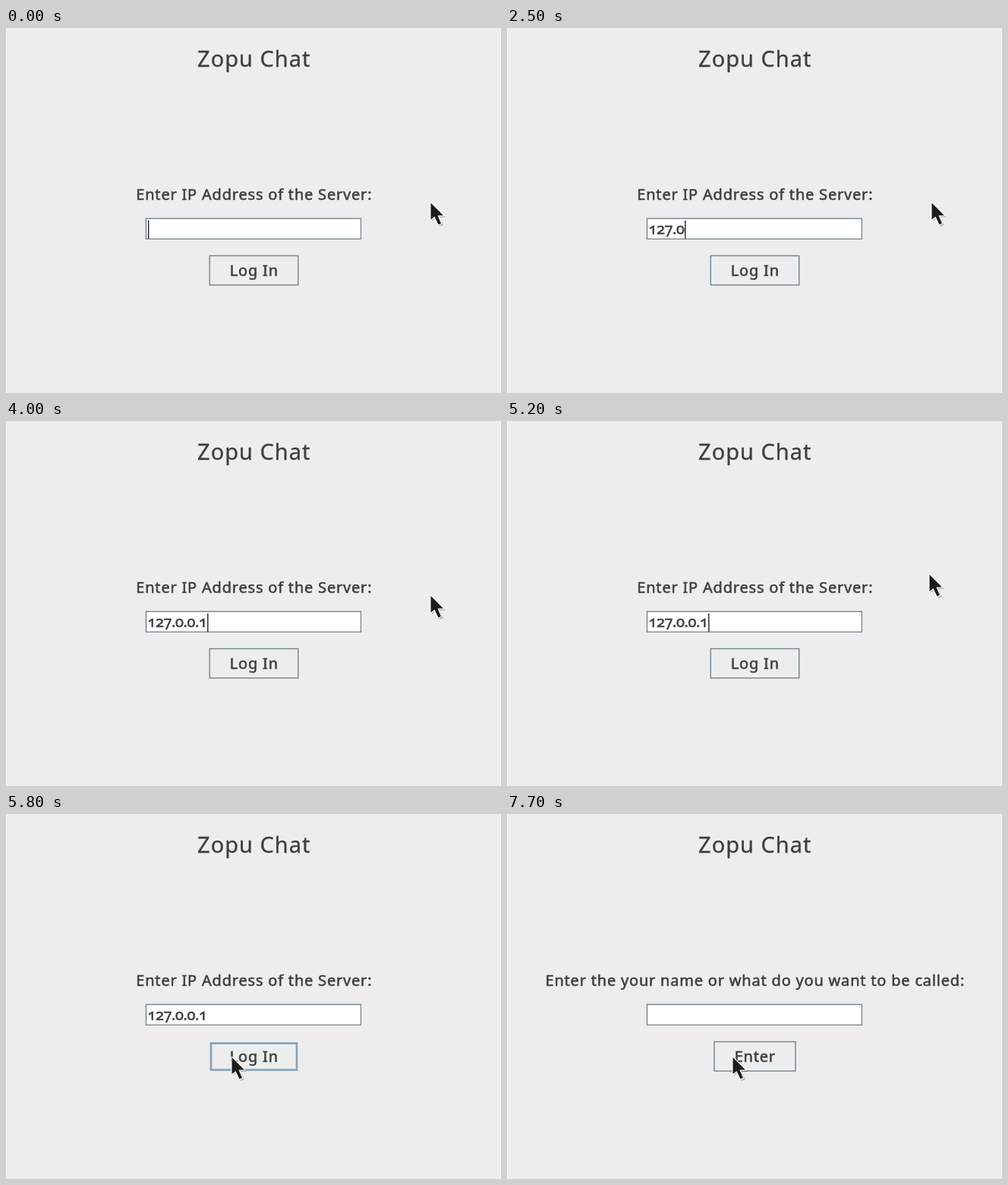
Animation of 652 by 480 pixels, one loop 8000 ms. Source, as an HTML page:

```html
<!DOCTYPE html>
<html lang="en">
<head>
<meta charset="utf-8">
<title>Chat login</title>
<style>
  html, body { margin: 0; width: 100%; height: 100%; overflow: hidden; background: #ededed; }
  svg { display: block; width: 652px; height: 480px; }
  text {
    font-family: "Noto Sans", "Open Sans", sans-serif; font-size: 20px; letter-spacing: .8px;
    fill: #3d3f3d; stroke: #3d3f3d; stroke-width: .55px;
  }
  .mid { text-anchor: middle; }
  #title { font-size: 29px; letter-spacing: 1px; stroke-width: .3px; }
  #entry { letter-spacing: -.4px; font-variant-numeric: oldstyle-nums; }
  .line { fill: none; stroke: #72838d; stroke-width: 1.4px; }
  #hover { stroke: #84a2bb; stroke-width: 2.6px; }
</style>
</head>
<body>
<svg viewBox="0 0 652 480">
  <rect width="652" height="480" fill="#ededed"/>
  <path d="M.5 0V480M651.5 0V480" stroke="#f7f7f7"/>
  <text id="title" class="mid" x="326.8" y="51">Zopu Chat</text>
  <text id="prompt" class="mid" x="326.8" y="225.5"></text>

  <rect x="184" y="250" width="285" height="29" fill="#fff"/>
  <rect class="line" x="184.5" y="250.5" width="283" height="27"/>
  <text id="entry" x="186.5" y="271"></text>
  <rect id="caret" y="253" width="1.4" height="24" fill="#222"/>

  <rect id="button" class="line" y="299.5" height="38.5"/>
  <rect id="hover" class="line" x="270" y="301.5" width="113" height="35"/>
  <text id="label" class="mid" x="326.8" y="325.5"></text>

  <g id="pointer">
    <path d="M2 3V25L7 21L12 32L17 30L12 20H20Z" fill="#000" opacity=".25"/>
    <path d="M.5 1V23L5.5 19L10.5 29.5L14 28L9.5 17.5H17Z" fill="#1c1c1c"
          stroke="#fff" stroke-width="2.4" stroke-linejoin="round" paint-order="stroke"/>
  </g>
</svg>
<script>
const LOOP = 8000, TICK = 100, BLINK = 500;
const MOVE = 5200, HOVER = 5600, SWITCH = 6000, FOCUS = 6200;
const ADDRESS = "127.0.0.1";
const keys = [600, 1000, 1600, 2200, 2500, 2700, 3200, 3600, 4000];
const rest = [559, 229], lift = [556, 201], target = [297, 319];
const screens = [
  { prompt: "Enter IP Address of the Server:", label: "Log In", width: 116.5 },
  { prompt: "Enter the your name or what do you want to be called:", label: "Enter", width: 107 }
];

const $ = id => document.getElementById(id);
const set = (id, attrs) => Object.entries(attrs).forEach(([k, v]) => $(id).setAttribute(k, v));
const show = (id, on) => set(id, { visibility: on ? "visible" : "hidden" });
const smooth = u => u * u * (3 - 2 * u);

// The blink restarts with each keystroke and each new focus
function caretVisible(t) {
  if (t >= HOVER && t < FOCUS) return false;
  const since = [-TICK, ...keys, FOCUS].findLast(k => k <= t);
  return Math.floor((t - since) / BLINK) % 2 === 0;
}

function pointerAt(t) {
  if (t < MOVE) return rest;
  const u = smooth(Math.min(1, (t - MOVE) / (HOVER - MOVE)));
  return lift.map((v, i) => v + (target[i] - v) * u);
}

function draw(time) {
  const t = Math.floor(time / TICK) * TICK;
  const screen = screens[+(t >= SWITCH)];
  $("prompt").textContent = screen.prompt;
  $("label").textContent = screen.label;
  set("button", { x: 326.5 - screen.width / 2, width: screen.width });

  const count = t < SWITCH ? keys.filter(k => k <= t).length : 0;
  $("entry").textContent = ADDRESS.slice(0, count);
  set("caret", { x: 187 + $("entry").getComputedTextLength() });
  show("caret", caretVisible(t));

  const hover = t >= HOVER && t < SWITCH;
  show("hover", hover);
  show("button", !hover);
  set("pointer", { transform: `translate(${pointerAt(t)})` });
}

const start = performance.now();
function frame(now) {
  draw(Math.max(0, now - start) % LOOP);
  requestAnimationFrame(frame);
}
draw(0);
requestAnimationFrame(frame);
</script>
</body>
</html>
```
